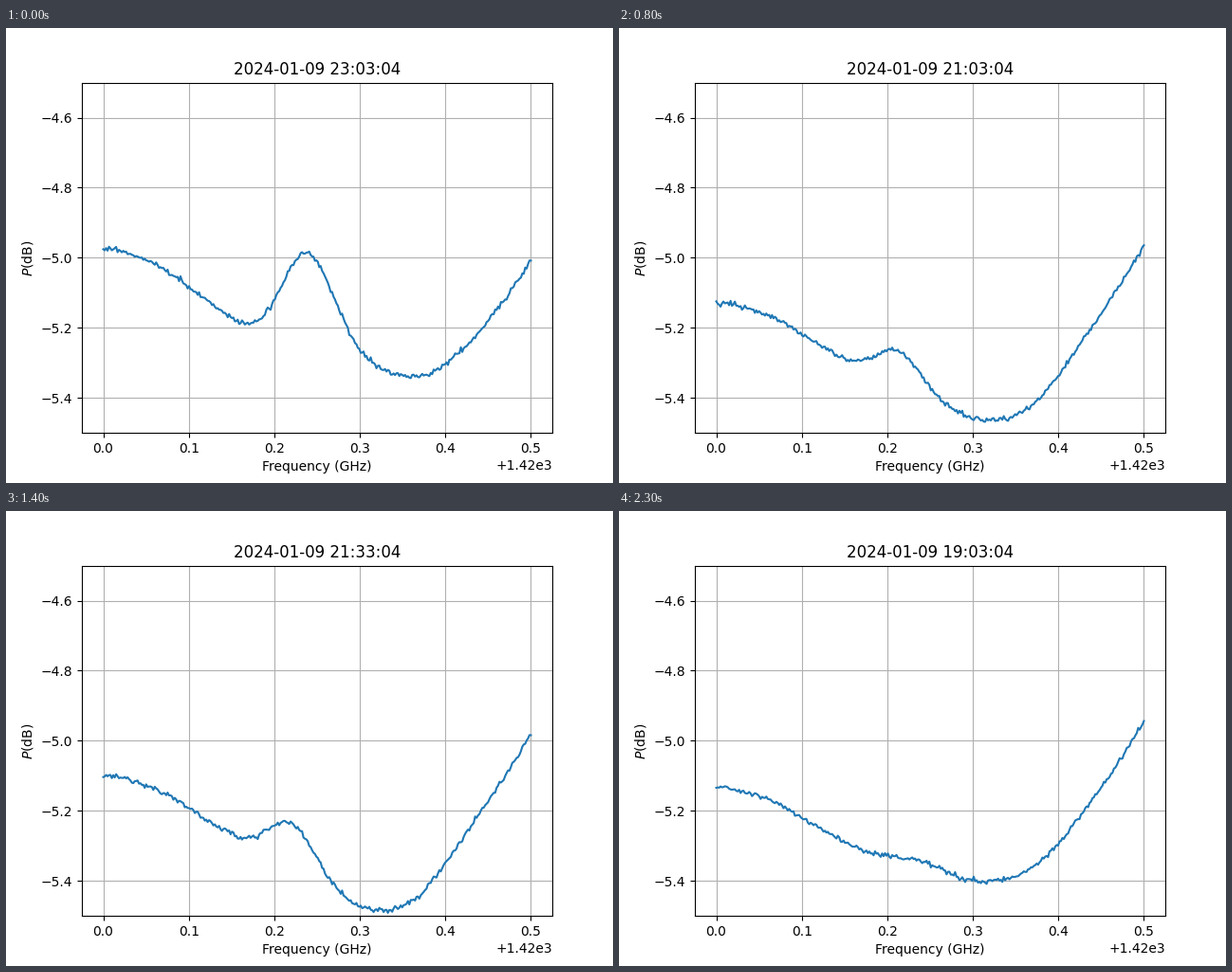
Recreate the animation shown at these times as a matplotlib script. Size 640 by 480 pixels, loop 2400 ms.

```python
import numpy as np
import matplotlib.pyplot as plt
from matplotlib.animation import FuncAnimation

START = np.datetime64("2024-01-09T14:03:04")
STEP_MIN = 30

# Half-hour steps after START, in the shuffled order they are shown
ORDER = [18, 18, 3, 20, 11, 5, 9, 17, 14, 2, 21, 6,
         0, 19, 15, 4, 13, 22, 16, 7, 12, 1, 8, 10]

SPAN = 0.5
FREQ = np.linspace(0, SPAN, 300)

# Receiver response in dB at evenly spaced frequencies
RESPONSE = np.array([-5.088, -5.130, -5.224, -5.326, -5.388,
                     -5.402, -5.356, -5.202, -4.985])

# Key poses: step, offset at the left and right ends,
# line (centre, height, width), broad hump (centre, height)
POSES = np.array([
    (0, 0.028, 0.010, 0.383, 0.170, 0.034, 0.265, -0.020),
    (7, 0.000, 0.000, 0.283, 0.042, 0.022, 0.350, 0.000),
    (9, -0.072, 0.058, 0.258, 0.044, 0.032, 0.350, -0.012),
    (10, -0.042, 0.040, 0.235, 0.045, 0.036, 0.360, -0.025),
    (13, -0.068, 0.030, 0.207, 0.082, 0.027, 0.350, -0.053),
    (15, -0.010, 0.005, 0.220, 0.140, 0.028, 0.340, -0.090),
    (18, 0.114, -0.020, 0.238, 0.275, 0.030, 0.280, 0.090),
    (21, 0.183, -0.020, 0.243, 0.270, 0.036, 0.355, 0.205),
])
HUMP_WIDTH = 0.055
NOISE = 0.0038


def bump(centre, height, width):
    return height * np.exp(-0.5 * ((FREQ - centre) / width) ** 2)


def smooth(y):
    """Cubic Hermite curve through evenly spaced knots."""
    m = np.gradient(y, edge_order=2)
    u = FREQ / SPAN * (len(y) - 1)
    i = np.minimum(u.astype(int), len(y) - 2)
    t = u - i
    return ((1 + 2 * t) * (1 - t) ** 2 * y[i] + t * (1 - t) ** 2 * m[i]
            + t * t * (3 - 2 * t) * y[i + 1] + t * t * (t - 1) * m[i + 1])


BASE = smooth(RESPONSE)
FADE = (1 + np.cos(np.pi * FREQ / SPAN)) / 2


def spectrum(step):
    steps, *tracks = POSES.T
    left, right, centre, height, width, hump_at, hump = (
        np.interp(step, steps, track) for track in tracks)
    power = BASE + right + (left - right) * FADE
    power += bump(centre, height, width) + bump(hump_at, hump, HUMP_WIDTH)
    return power + np.random.default_rng(step).normal(0, NOISE, FREQ.size)


fig, ax = plt.subplots(figsize=(6.4, 4.8), dpi=100)
trace, = ax.plot(1420 + FREQ, spectrum(ORDER[0]))
ax.set_ylim(-5.5, -4.5)
ax.set_xlabel("Frequency (GHz)")
ax.set_ylabel("$P$(dB)")
ax.grid(True)
title = ax.set_title("")


def update(frame):
    step = ORDER[frame]
    stamp = START + np.timedelta64(STEP_MIN * step, "m")
    title.set_text(str(stamp).replace("T", " "))
    trace.set_ydata(spectrum(step))
    return trace, title


anim = FuncAnimation(fig, update, frames=len(ORDER), interval=100,
                     repeat=True, repeat_delay=0)
plt.show()
```
